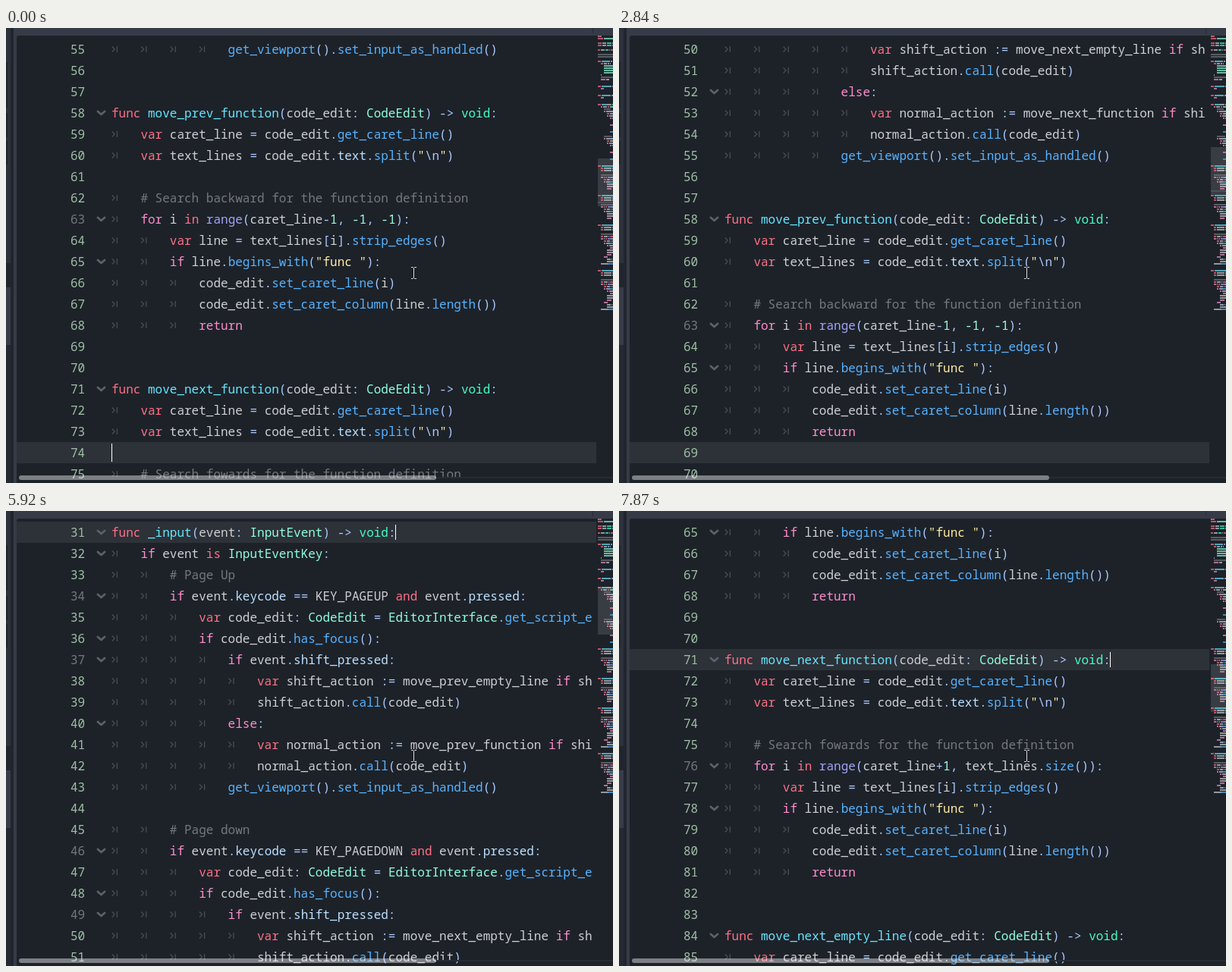
An HTML page that plays this animation: 800x600 px, repeating every 8000 ms.

```html
<!DOCTYPE html>
<html lang="en">
<head>
<meta charset="utf-8">
<title>Jumping between functions</title>
<style>
@property --top { syntax: "<integer>"; inherits: true; initial-value: 55; }
@property --line { syntax: "<integer>"; inherits: true; initial-value: 74; }
@property --x { syntax: "<integer>"; inherits: true; initial-value: 139; }
@property --half { syntax: "<integer>"; inherits: true; initial-value: 12; }

html, body { margin: 0; width: 100%; height: 100%; overflow: hidden; background: #363d4a; }
#stage {
  position: absolute; left: 0; top: 0; width: 800px; height: 600px; overflow: hidden;
  background: #363b47; color: #cdcfd2;
  font: 16px/28px "Noto Sans Mono", "DejaVu Sans Mono", monospace;
  font-variant-ligatures: none;
  animation: jump 8s step-end infinite;
}
#stage div, #stage svg { position: absolute; }

.side { left: 0; width: 6px; background: #2c313b; }
.edge { left: 6px; top: 0; width: 4px; height: 600px; background: #21262e; }
.mark { left: 0; width: 2px; background: #1f242b; }
.paper { left: 14px; top: 10px; width: 786px; height: 590px; background: #1d2229; border-top-left-radius: 3px; }
.tick { left: 773px; top: 0; width: 1px; height: 7px; background: #262b34; }

#view { left: 0; top: 10px; width: 778px; height: 590px; overflow: hidden; }
#rows { left: 0; top: 4px; width: 778px; transform: translateY(calc(var(--top) * -28px)); }
.row { left: 0; width: 772px; height: 28px; overflow: hidden; white-space: pre; }
.row > * { position: absolute; top: 0; }
.num { left: 85px; color: #9fbfa4; }
.num.unsafe { color: #74777c; }
#band { left: 14px; top: calc(var(--line) * 28px); width: 764px; height: 28px; background: #2d3138; }
#caret {
  left: calc(var(--x) * 1px); top: calc(var(--line) * 28px + 14px - var(--half) * 1px);
  width: 1px; height: calc(var(--half) * 2px); background: #fff;
  animation: blink 8s step-end infinite;
}
#icons { left: 0; top: 0; overflow: visible; fill: none; }
.tabs { stroke: #484c54; stroke-width: 1.3; }
.folds { stroke: #5c6067; stroke-width: 2.8; stroke-linecap: round; stroke-linejoin: round; }

#map { left: 780px; top: 0; }
#map rect { opacity: .68; }
.window { left: 780px; top: calc(var(--top) * 3px + 7px); width: 20px; height: 63px; background: rgba(255,255,255,.12); }
.here { left: 780px; top: calc(var(--line) * 3px + 7px); width: 20px; height: 2px; background: rgba(255,255,255,.1); }
.track { left: 567px; top: 592px; width: 233px; height: 2px; background: #272c33; }
.bar { left: 17px; top: 590px; width: 550px; height: 6px; border-radius: 3px; background: rgba(255,255,255,.42); }
#mouse { left: 530px; top: 312px; fill: none; }

.key { color: #ff7085; fill: #ff7085; }
.ctl { color: #ff8ccc; fill: #ff8ccc; }
.sym { color: #abc9ff; fill: #abc9ff; }
.fn { color: #57b3ff; fill: #57b3ff; }
.def { color: #66e6ff; fill: #66e6ff; }
.base { color: #42ffc2; fill: #42ffc2; }
.type { color: #8fffdb; fill: #8fffdb; }
.glob { color: #a3a3f5; fill: #a3a3f5; }
.mem { color: #bce0ff; fill: #bce0ff; }
.str { color: #ffeda1; fill: #ffeda1; }
.int { color: #a1ffe0; fill: #a1ffe0; }
.note { color: #75787d; fill: #75787d; }
.txt { color: #cdcfd2; fill: #cdcfd2; }

@keyframes jump {
  0% { --top: 55; --line: 74; --x: 139; --half: 12; }
  8.375% { --line: 70; }
  12.125% { --line: 61; }
  16.25% { --line: 57; }
  20.125% { --top: 44; --line: 44; }
  26.25% { --line: 56; }
  31.375% { --line: 61; }
  35.5% { --top: 50; --line: 69; }
  40.5% { --top: 55; --line: 74; }
  50.25% { --line: 71; --x: 647; --half: 10; }
  57% { --line: 58; }
  65.125% { --top: 31; --line: 31; --x: 513; }
  75.875% { --top: 39; --line: 58; --x: 647; }
  83.875% { --top: 52; --line: 71; }
  89.875% { --top: 65; --line: 84; --x: 667; }
  98.375%, 100% { --top: 65; --line: 71; --x: 647; --half: 10; }
}
@keyframes blink {
  0%, 12.125%, 24.625%, 36.75%, 48.875%, 61.5%, 74%, 86.375%, 98%, 100% { opacity: 1; }
  5.875%, 18.125%, 30.5%, 43.125%, 55.375%, 67.875%, 79.75%, 92.25% { opacity: 0; }
}
</style>
</head>
<body>
<div id="stage">
  <div class="side" style="top:0;height:310px"></div>
  <div class="side" style="top:310px;height:32px;background:#21262e"></div>
  <div class="side" style="top:342px;height:76px;background:#373c48"></div>
  <div class="side" style="top:418px;height:182px;background:#242932"></div>
  <div class="mark" style="top:45px;height:60px"></div>
  <div class="mark" style="top:112px;height:32px"></div>
  <div class="mark" style="top:149px;height:31px"></div>
  <div class="edge"></div>
  <div class="paper"></div>
  <div class="tick"></div>
  <div id="view">
    <div id="rows">
      <div id="band"></div>
      <svg id="icons" width="1" height="1"><path class="tabs"/><path class="folds"/></svg>
      <div id="caret"></div>
    </div>
  </div>
  <div class="window"></div>
  <div class="here"></div>
  <svg id="map" width="20" height="600" shape-rendering="crispEdges"></svg>
  <div class="track"></div>
  <div class="bar"></div>
  <svg id="mouse" width="16" height="22">
    <path d="M4 3.5H6.5L7.5 4.5L8.5 3.5H11M7.5 4V18M4 18.5H6.5L7.5 17.5L8.5 18.5H11" stroke="#14171c" stroke-width="2.4"/>
    <path d="M4 3.5H6.5L7.5 4.5L8.5 3.5H11M7.5 4V18M4 18.5H6.5L7.5 17.5L8.5 18.5H11" stroke="#e4e5e7"/>
  </svg>
</div>
<script>
const code = String.raw`@tool
extends EditorPlugin

const ROOT: String = "shortcuts/"
const FLAG: String = "swap"

var swap: bool = false

# Page keys jump in code
# Shift swaps the two

func _get_keys() -> Array:
	var keys := [
		InputEventKey,
		InputEventKey,
		InputEventKey,
		InputEventAction,
	]
	# Read the settings
	return keys


func _enter_tree() -> void:
	pass


func _exit_tree() -> void:
	pass


func _input(event: InputEvent) -> void:
	if event is InputEventKey:
		# Page Up
		if event.keycode == KEY_PAGEUP and event.pressed:
			var code_edit: CodeEdit = EditorInterface.get_script_editor().get_current_editor().get_base_editor()
			if code_edit.has_focus():
				if event.shift_pressed:
					var shift_action := move_prev_empty_line if shift_lines else move_prev_function
					shift_action.call(code_edit)
				else:
					var normal_action := move_prev_function if shift_lines else move_prev_empty_line
					normal_action.call(code_edit)
				get_viewport().set_input_as_handled()

		# Page down
		if event.keycode == KEY_PAGEDOWN and event.pressed:
			var code_edit: CodeEdit = EditorInterface.get_script_editor().get_current_editor().get_base_editor()
			if code_edit.has_focus():
				if event.shift_pressed:
					var shift_action := move_next_empty_line if shift_lines else move_next_function
					shift_action.call(code_edit)
				else:
					var normal_action := move_next_function if shift_lines else move_next_empty_line
					normal_action.call(code_edit)
				get_viewport().set_input_as_handled()


func move_prev_function(code_edit: CodeEdit) -> void:
	var caret_line = code_edit.get_caret_line()
	var text_lines = code_edit.text.split("\n")

	# Search backward for the function definition
	for i in range(caret_line-1, -1, -1):
		var line = text_lines[i].strip_edges()
		if line.begins_with("func "):
			code_edit.set_caret_line(i)
			code_edit.set_caret_column(line.length())
			return


func move_next_function(code_edit: CodeEdit) -> void:
	var caret_line = code_edit.get_caret_line()
	var text_lines = code_edit.text.split("\n")

	# Search fowards for the function definition
	for i in range(caret_line+1, text_lines.size()):
		var line = text_lines[i].strip_edges()
		if line.begins_with("func "):
			code_edit.set_caret_line(i)
			code_edit.set_caret_column(line.length())
			return


func move_next_empty_line(code_edit: CodeEdit) -> void:
	var caret_line = code_edit.get_caret_line()
	var text_lines = code_edit.text.split("\n")

	# Search forwards for an empty line
	var found = false
	for i in range(caret_line+1, text_lines.size()):
		var line = text_lines[i].strip_edges()
		if line.is_empty():
			if found:
				continue
			code_edit.set_caret_line(i)
			code_edit.set_caret_column(0)
			return
		else:
			found = true
			code_edit.queue_redraw()
	code_edit.center()


`;
const lines = code.split("\n").slice(0, 103);
lines.push(...lines.slice(83, 101));

const words = (s) => new Set(s.split(" "));
const control = words("if else for while return pass continue");
const keyword = words("func var const extends and in is tool true false");
const base = words("void bool String Array");
const unsafe = new Set([34, 37, 46, 49, 63, 76]);
const pattern = /#.*|"[^"]*"|[A-Za-z_]\w*|(?<!\w)-?\d+|\s+|[^\w\s]/g;

function kind(word, before, after) {
  if (word[0] === "#") return "note";
  if (word[0] === '"') return "str";
  if (/^-?\d/.test(word)) return "int";
  if (!/^\w/.test(word)) return "sym";
  if (control.has(word)) return "ctl";
  if (keyword.has(word)) return "key";
  if (base.has(word)) return "base";
  if (word === "range") return "glob";
  if (/^[A-Z][a-z]/.test(word)) return "type";
  if (before.endsWith("func ")) return "def";
  if (after[0] === "(") return "fn";
  return before.endsWith(".") ? "mem" : "txt";
}

function tokens(text) {
  return [...text.matchAll(pattern)].flatMap(({ 0: word, index }) => {
    const type = kind(word, text.slice(0, index), text.slice(index + word.length));
    if (type !== "str") return [{ word, type, index }];
    let at = index;
    return word.split(/(\\n)/).map((part) => {
      const piece = { word: part, type: part === "\\n" ? "sym" : "str", index: at };
      at += part.length;
      return piece;
    });
  });
}

function add(parent, tag, cls, text) {
  const el = document.createElement(tag);
  el.className = cls;
  if (text) el.textContent = text;
  return parent.appendChild(el);
}

const rows = document.getElementById("rows");
const icons = document.getElementById("icons");
const map = document.getElementById("map");
const indent = (line = "") => line.match(/^\t*/)[0].length;
let tabs = "", folds = "";

function drawRow(n, depth, parts) {
  const row = document.createElement("div");
  row.className = "row";
  row.style.top = n * 28 + "px";
  rows.insertBefore(row, icons);
  add(row, "span", unsafe.has(n) ? "num unsafe" : "num", String(n));
  const body = add(row, "span", "");
  body.style.left = 139 + depth * 38.4 + "px";
  for (const { word, type } of parts) add(body, "span", type, word);

  const mid = n * 28 + 14;
  for (let k = 0; k < depth; k++)
    tabs += `M${139.8 + k * 38.4} ${mid - 3.5}l3.4 3.5l-3.4 3.5m6.6 -7.5v8`;
  if (parts.length && indent(lines[n]) > depth) folds += `M121 ${mid - 2}l4.5 4l4.5 -4`;
}

function drawMini(n, depth, parts) {
  for (const { word, type, index } of parts) {
    const x = depth * 4 + index;
    if (x >= 20 || !word.trim()) continue;
    const r = document.createElementNS("http://www.w3.org/2000/svg", "rect");
    const box = { x, y: n * 3 + 7, width: word.length, height: 2, class: type };
    for (const key in box) r.setAttribute(key, box[key]);
    map.appendChild(r);
  }
}

lines.forEach((line, i) => {
  const n = i + 1, depth = indent(line), parts = tokens(line.slice(depth));
  if (n > 30 && n < 87) drawRow(n, depth, parts);
  drawMini(n, depth, parts);
});
icons.querySelector(".tabs").setAttribute("d", tabs);
icons.querySelector(".folds").setAttribute("d", folds);
</script>
</body>
</html>
```
